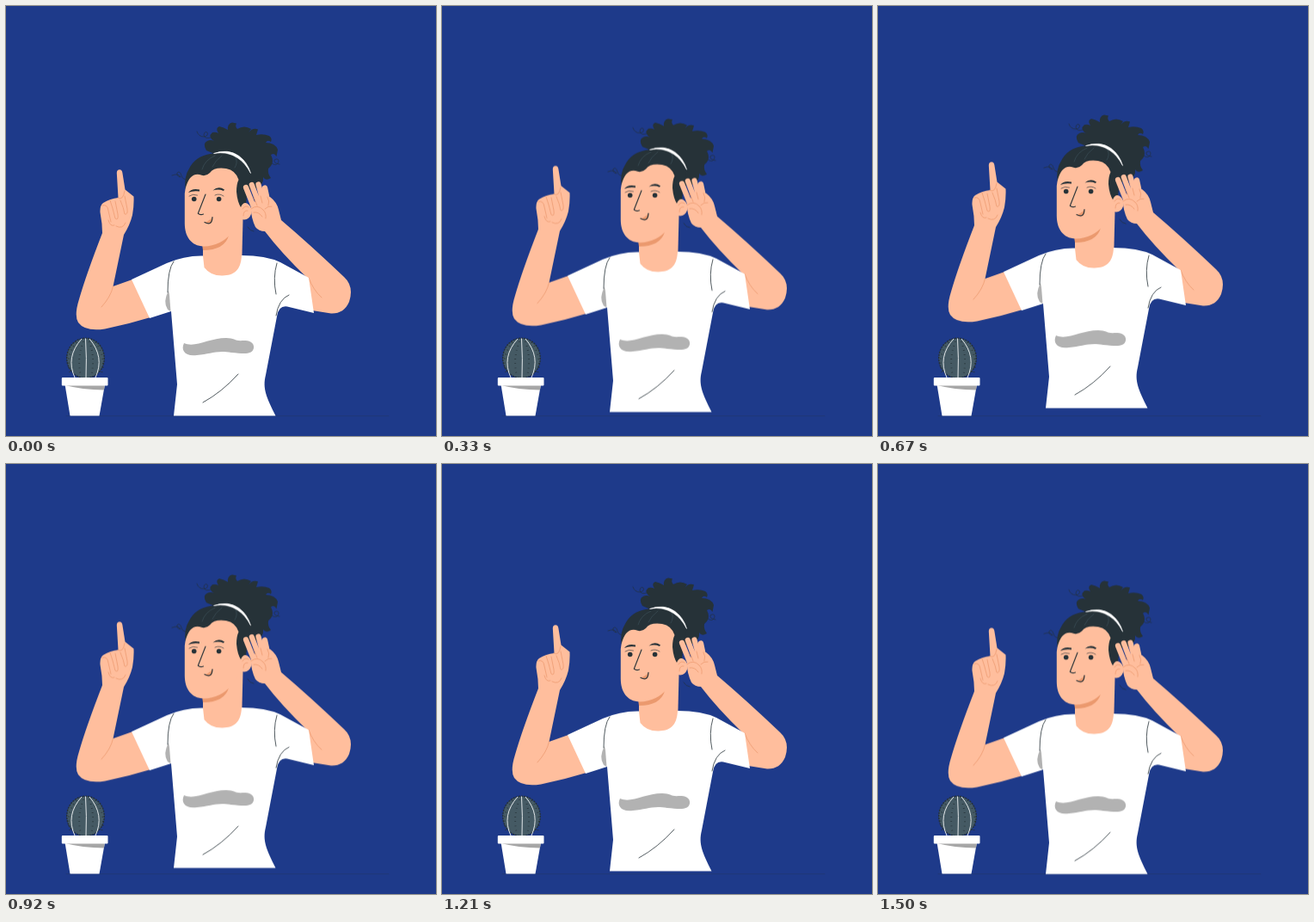
These frames come from a looping animation (500 by 500 pixels, 1540 ms). An HTML page:

```html
<!DOCTYPE html>
<html lang="en">
<head>
<meta charset="utf-8">
<title>Listening</title>
<style>
  html, body { margin: 0; width: 100%; height: 100%; overflow: hidden; background: #1e3a8a; }
  svg { display: block; width: 100vw; height: 100vh; }
  .person { animation: float 1540ms linear infinite; }
  @keyframes float {
    0%, 100% { transform: translateY(0); }
    46.1% { transform: translateY(-9.4px); }
    96.8% { transform: translateY(.4px); }
  }
  .skin { fill: #ffbe9d; }
  .shade { fill: #eb996e; }
  .hair { fill: #263238; }
  .white { fill: #fff; }
  .grey { fill: #b2b2b2; }
  .fingers { fill: none; stroke: #ffbe9d; stroke-width: 6.2; stroke-linecap: round; }
  .line { fill: none; stroke: #263238; stroke-width: .8; stroke-linecap: round; stroke-linejoin: round; }
  .crease { fill: none; stroke: #eb996e; stroke-width: .7; stroke-linecap: round; stroke-linejoin: round; }
  .curl { stroke-width: .6; }
  .strand { stroke: #455a64; stroke-width: .5; }
  .rib { fill: none; stroke: #e4e9eb; stroke-width: 1; }
  .spines { fill: none; stroke: #263238; stroke-width: 2; stroke-dasharray: .7 4.5; }
</style>
</head>
<body>
<svg viewBox="0 0 500 500">
  <path class="line" d="M70 476.7H445" stroke-opacity=".4" style="stroke-width:.6"/>

  <g class="person">
    <!-- Bun and loose curls -->
    <path class="hair" d="M233 168Q228 160 234 157Q238 155 242 157Q234 152 240 147Q244 146 247 148Q243 142 248 140Q253 141 258 144Q257 137 263 135.5L268 136.5Q266 140 269 143Q277 138 285 143L282 147Q287 141 293 143.5L291 150Q299 148 306 151Q310 154 308 158Q304 155 302 159Q313 159 316 167L314.5 175Q312 170 308 173Q312 181 308 186L305 189Q304 195 308 200Q302 204 299 199Q300 207 292 212L281 214L262 180Z"/>
    <path class="line curl" d="M238 153Q231 155 230 150Q231 145 234 147Q236 151 230 152Q224 152 222 146M211 202Q205 202 204 197Q202 191 199 194Q198 198 203 199Q201 194 193 197M309 183Q315 187 317 181Q317 176 312 179Q311 183 318 184M281 257Q284 262 288 262"/>

    <!-- Neck and face -->
    <path class="skin" d="M229 270V308Q250 325 274 307L276 228L250 245Z"/>
    <path class="shade" d="M228 277Q247 278 259 267Q254 284 229 284Z"/>
    <path class="skin" d="M210 203L207.8 218V253C208 268 215 279 230 279.5Q250 279 262 264L276 244V200Q266 179 245 182Q220 184 210 203Z"/>
    <path class="hair" d="M208.5 213Q207 198 213 189Q220 175 237 172Q257 168 271 178Q283 186 284 199L281 213L279 230Q276 230 273.5 235Q269 228 268 216Q268 207 270.5 202Q267 191 256 189Q242 187 237 194Q232 199 225 196Q213 194 208.5 213Z"/>
    <path class="line strand" d="M228 190Q231 179 243 174M240 187Q243 180 251 174M266 188Q270 182 267 176"/>
    <path d="M241.5 171.5Q258 165.5 271 174.5Q281 182 284.5 194.5Q278 182 269 176.5Q257 168.5 241.5 171.5Z" fill="#fff" stroke="#fff" stroke-width=".6"/>
    <path class="skin" d="M273 234Q276 227 281 230Q287 234 285 242Q282 250 274 248Z"/>
    <path class="crease" d="M275 236Q278 231 282 234M276 244Q276 237 281 238"/>

    <path class="hair" d="M212 217Q216 211.5 225 213.5V215.5Q217 214.5 212 217ZM240.5 214.5Q247 208.5 254 213.5L253 215Q247 212.5 240.5 214.5Z"/>
    <path class="line" style="stroke-width:.6" d="M213 221Q217 218 222.5 220M243 220Q248 217.5 253 221"/>
    <circle class="hair" cx="218.7" cy="224.5" r="2.8"/>
    <circle class="hair" cx="247.6" cy="224.5" r="2.8"/>
    <path class="line" style="stroke-width:1.1" d="M232 219L223.3 241.3Q226 243.5 229.5 242"/>
    <path class="shade" d="M231 251.5Q236 250.5 240 245.5Q241 257 231 251.5Z"/>
    <path class="line" style="stroke-width:1.2" d="M231 251.5Q239.5 256 240 245.5"/>

    <!-- Pointing arm -->
    <path class="skin" d="M130.5 223L128.8 194Q129 190.3 132 190.3Q135 190.5 135.4 194L138.5 213.5L148.5 221.5Q149 232 147 243Q144 255 137 266L124.5 326L147 318L168 362Q142 370 115 375.5Q92 379 84 368Q79 360 85 341Q93 313 112 264Q112 253 109.5 240Q109 232 113 229Q121 224 130.5 223Z"/>
    <path class="crease" d="M130 223Q136 227 138 215M112 232Q118 230 119 238L122 251M121 226Q124 234 127 247Q131 250 130 242L127 227M133 226Q137 235 138 242Q142 243 141 236L138 221M119 249Q121 257 126 255M128 256Q136 260 139 252M124.5 326Q122 338 111 350"/>

    <!-- Listening arm -->
    <path class="fingers" d="M279 211L291 241M285.8 208L296 235M293.5 207.5L301 235M301 211.5L306 235"/>
    <path class="skin" d="M285 232L293 224L307 222Q315 228 317 237L320 249Q353 277 393 315Q405 326 399 344Q393 358 378 357.5L356 354L350 316Q320 287 301 262Q294 262 290 257Q284 244 285 232Z"/>
    <path class="crease" d="M288 222L292 232M296 221L298 229M304 222Q307 227 305 232M285 236Q292 230 299 237Q303 241 302 247M288 240Q294 239 298 245M301 236Q305 232 309 233M352 316Q357 330 367 339"/>

    <!-- Shirt -->
    <path class="white" d="M146 318L187 299Q208 290 229 290.5L230.5 304Q238 314 252 313.5C265 313 273 308 274 290Q302 290 319 298L352 316L358 357L327 349.5Q317 348 315 361L302 429C298 445 303 455 313.5 476.5H195L199 440L192 355L167 363Z"/>
    <path class="grey" d="M189 331Q182 344 188 353L191.5 355L190 336Z"/>
    <path class="line" d="M195 297Q188 306 188 333M315 299Q310 316 314 335M329 336Q317 341 314 360M229 461Q251 449 270 428"/>
    <path class="grey" d="M207 392C220 398 236 386 256 386C266 386 266 390 276 389C286 388 289 394 288 398C286 406 276 404 262 403C244 400 238 405 222 406C208 408 203 400 207 392Z"/>
  </g>

  <!-- Cactus -->
  <ellipse cx="92.5" cy="409.5" rx="21.5" ry="23" fill="#455a64"/>
  <ellipse class="line" cx="92.5" cy="409.5" rx="21.8" ry="23.3" style="stroke-width:1.4;stroke-dasharray:1 2.2"/>
  <path class="spines" d="M82 391Q67 410 76 430M90 390Q82 410 87 430M97 390Q104 410 99 430M104 391Q118 410 110 430"/>
  <path class="rib" d="M88 387Q69 408 80 432M92.5 386.5Q94 410 93 432M97 387Q115 408 104 432"/>
  <path class="white" d="M68.5 440H115L108.5 476.5H74.5Z"/>
  <path fill="#a6a6a6" d="M68.7 441H114.8L114 446.5Q88 446 68.7 441Z"/>
  <rect class="white" x="64.8" y="432" width="53.7" height="9.5" rx="1"/>
</svg>
</body>
</html>
```
